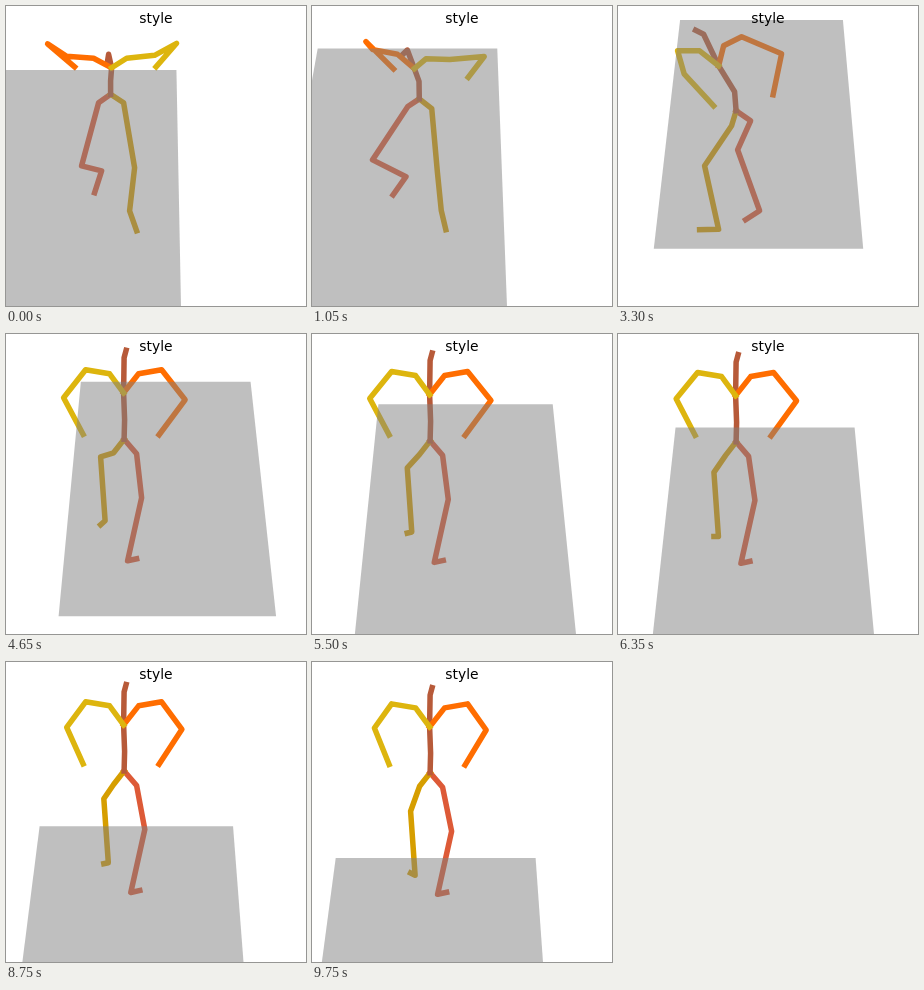
An HTML page for the animation above (9.8 s loop, 300 px wide and 300 px high).

```html
<!DOCTYPE html>
<html lang="en">
<head>
<meta charset="utf-8">
<title>style</title>
<style>
  html, body { margin: 0; width: 100%; height: 100%; overflow: hidden; background: #fff; }
  svg { display: block; width: 300px; height: 300px; }
  #body path { fill: none; stroke-width: 5.5; stroke-linecap: square; stroke-linejoin: round; }
  #floor { fill: rgba(128, 128, 128, .5); }
  text { font: 13.89px "DejaVu Sans", sans-serif; text-anchor: middle; }
</style>
</head>
<body>
<svg viewBox="0 0 300 300">
  <g id="body" transform="translate(-.4 -.2)">
    <path id="rightLeg" stroke="#DD5A37"/>
    <path id="leftLeg" stroke="#D69E00"/>
    <path id="spine" stroke="#B75A39"/>
    <path id="rightArm" stroke="#FF6D00"/>
    <path id="leftArm" stroke="#DDB50E"/>
  </g>
  <path id="floor"/>
  <text x="150" y="17">style</text>
</svg>
<script>
const LOOP = 9800, STEP = 50, SETTLED = 4650, LAST = 9750;
const LIMBS = ['rightLeg', 'leftLeg', 'spine', 'rightArm', 'leftArm'];

// Key poses of the turn. Legs and spine grow from the pelvis, arms from the chest.
const POSES = [
  { time: 0,
    spine: '105,88.5 105,75 106,62 103,48.5 102,55',
    rightLeg: '93,97 76,160 96,165 89,187',
    leftLeg: '118,97 129,162 124,205 131,225',
    rightArm: '88,52.5 61,50.5 42,38 69,61',
    leftArm: '121,52.5 149,49.5 171,37.5 150.5,61' },
  { time: 2000,
    spine: '110,97 109.5,76 100,63.5 89.5,40.5 81,44',
    rightLeg: '99,104 48,149 93,176 75,191',
    leftLeg: '122,108 123,170 134.5,204 137,223',
    rightArm: '84,45 61.5,38 65,34 93,65',
    leftArm: '108.5,53.5 129,57.5 174,62 162,80.5' },
  { time: 3300,
    spine: '118.5,105 117,86 101,60 86,28.5 78,24.5',
    rightLeg: '133,115 120,144 142,205 128,214',
    leftLeg: '114,120 87,160 101,223.5 82,224',
    rightArm: '106,40 124,31 164,48 155.5,89',
    leftArm: '82,45 60,45 66.5,68 96,100' },
  { time: SETTLED,
    spine: '118.5,105.5 119,86 118,59 118.5,24 120.5,16.5',
    rightLeg: '131,120 136,164 122,227 131,225',
    leftLeg: '108,119 95,123 99.5,187 95,191',
    rightArm: '133,40 156,36 179.5,66 153.5,101',
    leftArm: '104,40 80,36 58,64 77.5,100.5' },
];

for (const pose of POSES) {
  for (const name of LIMBS) {
    pose[name] = pose[name].split(' ').map(p => p.split(',').map(Number));
  }
  const [pelvis, , chest] = pose.spine;
  for (const name of LIMBS) {
    if (name !== 'spine') pose[name].unshift(name.endsWith('Leg') ? pelvis : chest);
  }
}

const mix = (a, b, u) => a + (b - a) * u;
const linear = (t, from, to) => Math.min(1, Math.max(0, (t - from) / (to - from)));
const smooth = (t, from, to) => {
  const u = linear(t, from, to);
  return u * u * (3 - 2 * u);
};

// After the turn the body sinks slowly while the left foot bobs down to the ground.
function settle(name, i, [x, y], p) {
  const wave = Math.sin(2 * Math.PI * p);
  const drop = 5.5 * p + .8 * wave;
  if (name.endsWith('Arm')) {
    if (i === 3) x = mix(x, 118, .08 * p * p);
    return [x, y + drop * (i < 3 ? 1.1 : .4)];
  }
  if (name === 'spine') return [x, y + drop * (i < 3 ? 1 : 1.7)];
  if (i > 1) x += 4 * p;
  if (i > 1 && name === 'leftLeg') y += (21 * p + 7 * wave) * (i < 4 ? 1 : .7);
  return [x, y + drop];
}

function limbPath(name, t) {
  const i = Math.max(1, POSES.findIndex(pose => t < pose.time));
  const k = t < SETTLED ? i : POSES.length - 1;
  const a = POSES[k - 1], b = POSES[k];
  const u = smooth(t, a.time, b.time), p = linear(t, SETTLED, LAST);
  return 'M' + a[name].map(([x, y], j) => {
    const [bx, by] = b[name][j];
    return settle(name, j, [mix(x, bx, u), mix(y, by, u)], p).map(n => n.toFixed(2));
  }).join(' ');
}

// Ground rectangle in perspective with vanishing point (VX, VY).
const VX = 154, VY = -785;

// Sideways drift of the ground: [distance, from, to].
const DRIFT = [
  [20, 0, 1000], [77, 2000, 4000], [-16, 5000, 6000],
  [5, 6350, 6750], [-17, 6900, 7700], [-13, 8000, 9500],
];

function floorPath(t) {
  const s = (t - 3300) / 1000;
  const away = 7 + 28.5 * (1 + Math.cos(Math.PI * linear(t, 0, 2500)));
  const top = Math.max(away, 14 + 24.2 * s + .62 * s * s);
  const extra = 1 - linear(t, 2000, 3100);
  const bottom = 226.3 + 1.17 * top + 24 * extra;
  const side = DRIFT.reduce((x, [d, from, to]) => x + d * smooth(t, from, to), 175);
  const right = (side - VX) / (300 - VY), left = right - .2038 - .0132 * extra;
  const at = (k, y) => (VX + k * (y - VY)).toFixed(2) + ',' + y.toFixed(2);
  return `M${at(left, top)} ${at(right, top)} ${at(right, bottom)} ${at(left, bottom)}Z`;
}

const setPath = (id, d) => document.getElementById(id).setAttribute('d', d);

function draw(now) {
  const t = Math.floor(now % LOOP / STEP) * STEP;
  for (const name of LIMBS) setPath(name, limbPath(name, t));
  setPath('floor', floorPath(t));
}

let begin = null;
function tick(now) {
  begin ??= now;
  draw(now - begin);
  requestAnimationFrame(tick);
}
draw(0);
requestAnimationFrame(tick);
</script>
</body>
</html>
```
